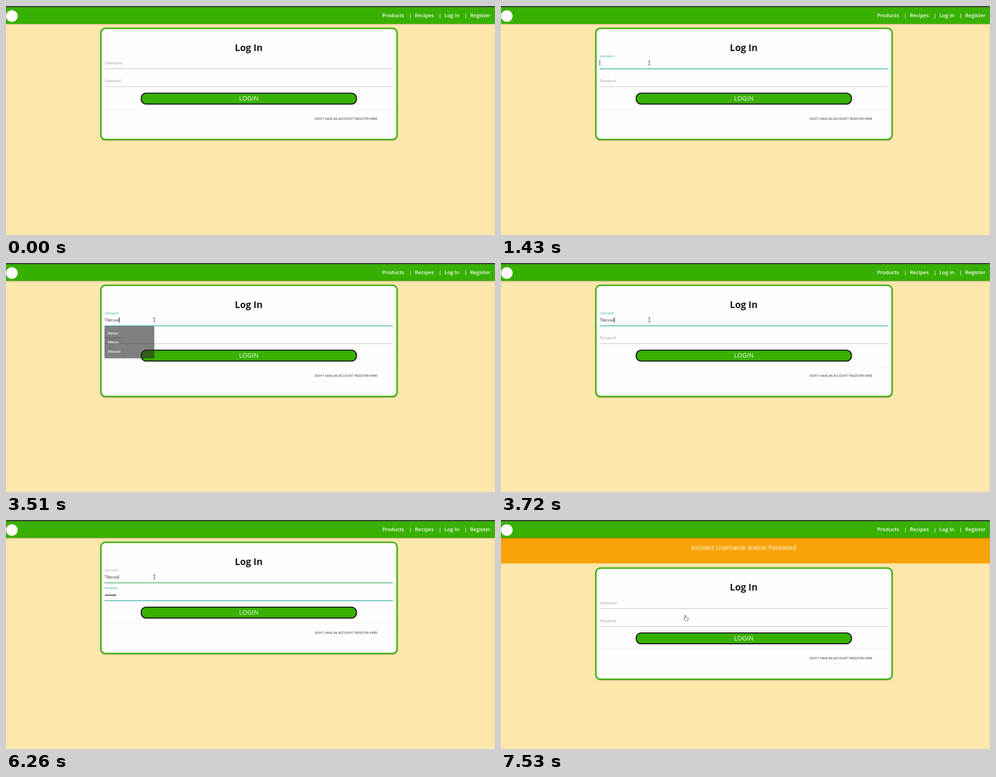
Recreate the animation shown at these times as an HTML page. Size 1092 by 513 pixels, loop 8 s.

```html
<!DOCTYPE html>
<html lang="en">
<head>
<meta charset="utf-8">
<title>Log In</title>
<style>
  html, body { margin: 0; width: 100%; height: 100%; overflow: hidden; background: #fde7ad; }
  svg { display: block; width: 100vw; height: 100vh; font-family: "Open Sans", sans-serif; }
  text { white-space: pre; }
  .nav text { font-size: 11.52px; font-weight: 600; fill: #fff; }
  .label { font-size: 8.07px; }
  .shadow { filter: drop-shadow(0 1px 1.2px rgba(0, 0, 0, .32)); }
  #menu text { font-size: 7px; font-weight: 700; fill: #f1f1f1; }
</style>
</head>
<body>
<svg viewBox="0 0 1092 513">
  <rect width="1092" height="513" fill="#fde7ad"/>
  <g id="banner">
    <rect y="38" width="1092" height="59.3" fill="#faa307"/>
    <text x="542" y="66.8" font-size="13.82" font-weight="500" fill="#fff" text-anchor="middle">Incorect Username and/or Password</text>
  </g>
  <g class="nav">
    <rect class="shadow" width="1092" height="40" fill="#38b000"/>
    <rect width="1092" height="2.6" fill="#3b3a3c"/>
    <circle cx="13" cy="22.5" r="13" fill="#fff"/>
    <text x="840" y="25.2">Products</text>
    <text x="900" y="25.2">|</text>
    <text x="913" y="25.2">Recipes</text>
    <text x="966" y="25.2">|</text>
    <text x="979" y="25.2">Log In</text>
    <text x="1023.5" y="25.2">|</text>
    <text x="1036.5" y="25.2">Register</text>
  </g>
  <g id="page">
    <rect class="shadow" x="212" y="50" width="661.2" height="249" rx="10" fill="#fefefe" stroke="#38b000" stroke-width="3"/>
    <text x="542" y="100.7" font-size="20.74" font-weight="700" fill="#1d1d1d" text-anchor="middle">Log In</text>
    <text class="label" id="userLabel">Username</text>
    <text class="label" id="passLabel">Password</text>
    <path id="userLine" d="M220 140.7H864"/>
    <path id="passLine" d="M220 180.7H864"/>
    <text id="user" x="220.4" y="131.4" font-size="8.64" fill="#222"></text>
    <g id="dots" fill="#111"></g>
    <rect id="caret" width="1" height="12.5" fill="#111"/>
    <rect class="shadow" id="button" x="302" y="195.2" width="480.6" height="24.2" rx="11" stroke-width="2"/>
    <text x="542.3" y="212.2" font-size="13.82" letter-spacing=".36" fill="#fff" text-anchor="middle">LOGIN</text>
    <path d="M220 232H864" stroke="#ebebeb" stroke-width=".8"/>
    <text x="689.3" y="254.7" font-size="6.91" fill="#222">DON'T HAVE AN ACCOUNT? REGISTER HERE</text>
  </g>
  <g id="menu">
    <rect class="shadow" id="menuBox" x="220" y="141.5" width="111" rx="2" fill="#292a2d"/>
  </g>
  <path d="M1091.5 0V513" stroke="#aaa" stroke-opacity=".4"/>
  <g id="mouse">
    <path id="beam" d="M-2.5 -4.5H-.8L0 -4L.8 -4.5H2.5M0 -4V4M-2.5 4.5H-.8L0 4L.8 4.5H2.5" fill="none" stroke="#333" stroke-width=".9"/>
    <path id="arrow" d="M0 0V12L2.8 9.5L4.7 13.7L6.4 12.9L4.6 8.8H8.4Z" fill="#fff" stroke="#111" stroke-width=".7"/>
    <path id="hand" d="M-1 .6Q0 -.9 1.1 .6V4.6Q2.2 3.7 3 4.9Q4.1 4.2 4.8 5.4Q6.2 5 6.4 6.6V9.2Q6.3 11 5.3 12.8H0L-3.1 8.3Q-3.7 6.7 -2.3 6.9L-1 8.2Z" fill="#fff" stroke="#222" stroke-width=".8" stroke-linejoin="round"/>
  </g>
</svg>
<script>
const LOOP = 8000, FOCUS = 895, TAB = 3905, CLICK = 6720, RELOAD = 7530;
const NAME = "Tilecuv4";
const KEYS = [1770, 1970, 2170, 2300, 2500, 2700, 2900, 3380];
const SAVED = ["tilecuv", "Tilecuv", "tilecvu", "Tilecuv2"];
const DOTS = 7, DOT_START = 4880, DOT_GAP = 130, DOT_STEP = 3.66;
const GREY = [158, 158, 158], RULE = [184, 184, 184], TEAL = [38, 166, 154], GREEN = [66, 172, 82];

const $ = id => document.getElementById(id);
const set = (el, attrs) => { for (const k in attrs) el.setAttribute(k, attrs[k]); };
const show = (el, on) => set(el, { visibility: on ? "visible" : "hidden" });
const clamp = v => Math.min(1, Math.max(0, v));
const easeOut = p => 1 - (1 - p) ** 2;
const easeInOut = p => p * p * (3 - 2 * p);
const span = (t, start, length) => clamp((t - start) / length);
const lerp = (a, b, p) => a + (b - a) * p;
const mix = (a, b, p) => a.map((v, i) => lerp(v, b[i], p));
const rgb = c => `rgb(${c.map(Math.round)})`;

function add(parent, tag, attrs) {
  const el = document.createElementNS("http://www.w3.org/2000/svg", tag);
  set(el, attrs);
  return parent.appendChild(el);
}

const dots = Array.from({ length: DOTS }, (_, i) =>
  add($("dots"), "circle", { cx: 222.6 + i * DOT_STEP, cy: 168.3, r: 1.4 }));
const rows = SAVED.map((_, i) =>
  add($("menu"), "text", { x: 227, y: 159.5 + i * 20.75 }));

function drawField(id, t, y, focus, blur) {
  const up = easeOut(span(t, focus, 200));
  const lit = easeOut(span(t, focus, 250));
  const done = easeOut(span(t, blur, 200));
  set($(id + "Label"), {
    transform: `translate(220.2 ${lerp(y, y - 16.4, up)}) scale(${lerp(1, .8, up)})`,
    fill: rgb(mix(mix(GREY, TEAL, up), GREY, done))
  });
  set($(id + "Line"), {
    stroke: rgb(mix(mix(RULE, TEAL, lit), GREEN, done)),
    "stroke-width": lerp(1, 1.5, lit)
  });
}

function drawMenu(t, typed) {
  const fading = t >= KEYS[7];
  const prefix = NAME.slice(0, Math.min(typed, 7)).toLowerCase();
  const items = SAVED.filter(s => s.toLowerCase().startsWith(prefix));
  show($("menu"), typed > 0 && t < 3700);
  set($("menu"), { opacity: fading ? 1 - span(t, KEYS[7], 320) : 1 });
  set($("menuBox"), { height: 9.5 + items.length * 20.75 });
  rows.forEach((row, i) => row.textContent = items[i] || "");
}

function drawCaret(t, typed, dotCount) {
  const inPass = t >= TAB;
  let last = inPass ? TAB : FOCUS;
  if (inPass && dotCount) last = DOT_START + (dotCount - 1) * DOT_GAP;
  if (!inPass && typed) last = KEYS[typed - 1];
  const width = inPass ? dotCount * DOT_STEP : typed && $("user").getComputedTextLength();
  set($("caret"), { x: 220.2 + width, y: inPass ? 161.3 : 121.3 });
  show($("caret"), t >= FOCUS && t < CLICK && (t - last) % 1080 < 540);
}

function drawMouse(t) {
  const come = easeOut(span(t, 110, 740));
  const go = easeInOut(span(t, 6430, 550));
  const x = lerp(lerp(1020, 331, come), 411.5, go);
  const y = lerp(lerp(495, 127.5, come), 213, go);
  const overField = x > 220 && x < 864 && (y > 116 && y < 141 || y > 156 && y < 181);
  const overButton = x > 301 && x < 784 && y > 194 && y < 220.5;
  set($("mouse"), { transform: `translate(${x} ${y})` });
  const kind = t < 130 ? "" : overField ? "beam" : overButton ? "hand" : "arrow";
  for (const id of ["beam", "hand", "arrow"]) show($(id), id === kind);
  const hover = kind === "hand" && t < RELOAD;
  set($("button"), {
    fill: hover ? "#000" : "#38b000",
    stroke: hover ? "#38b000" : "#0a0a0a"
  });
}

function render(t) {
  const reloaded = t >= RELOAD;
  const form = reloaded ? 0 : t;
  const typed = KEYS.filter(k => form >= k).length;
  const dotCount = form < DOT_START ? 0 : Math.min(DOTS, 1 + Math.floor((form - DOT_START) / DOT_GAP));

  show($("banner"), reloaded);
  set($("page"), { transform: `translate(0 ${reloaded ? 57.7 : 0})` });
  $("user").textContent = NAME.slice(0, typed);
  dots.forEach((dot, i) => show(dot, i < dotCount));
  drawField("user", form, 131.2, FOCUS, TAB);
  drawField("pass", form, 171.2, TAB, CLICK);
  drawMenu(form, typed);
  drawCaret(form, typed, dotCount);
  drawMouse(t);
}

const begin = performance.now();
function tick() {
  render((performance.now() - begin) % LOOP);
  requestAnimationFrame(tick);
}
tick();
</script>
</body>
</html>
```
